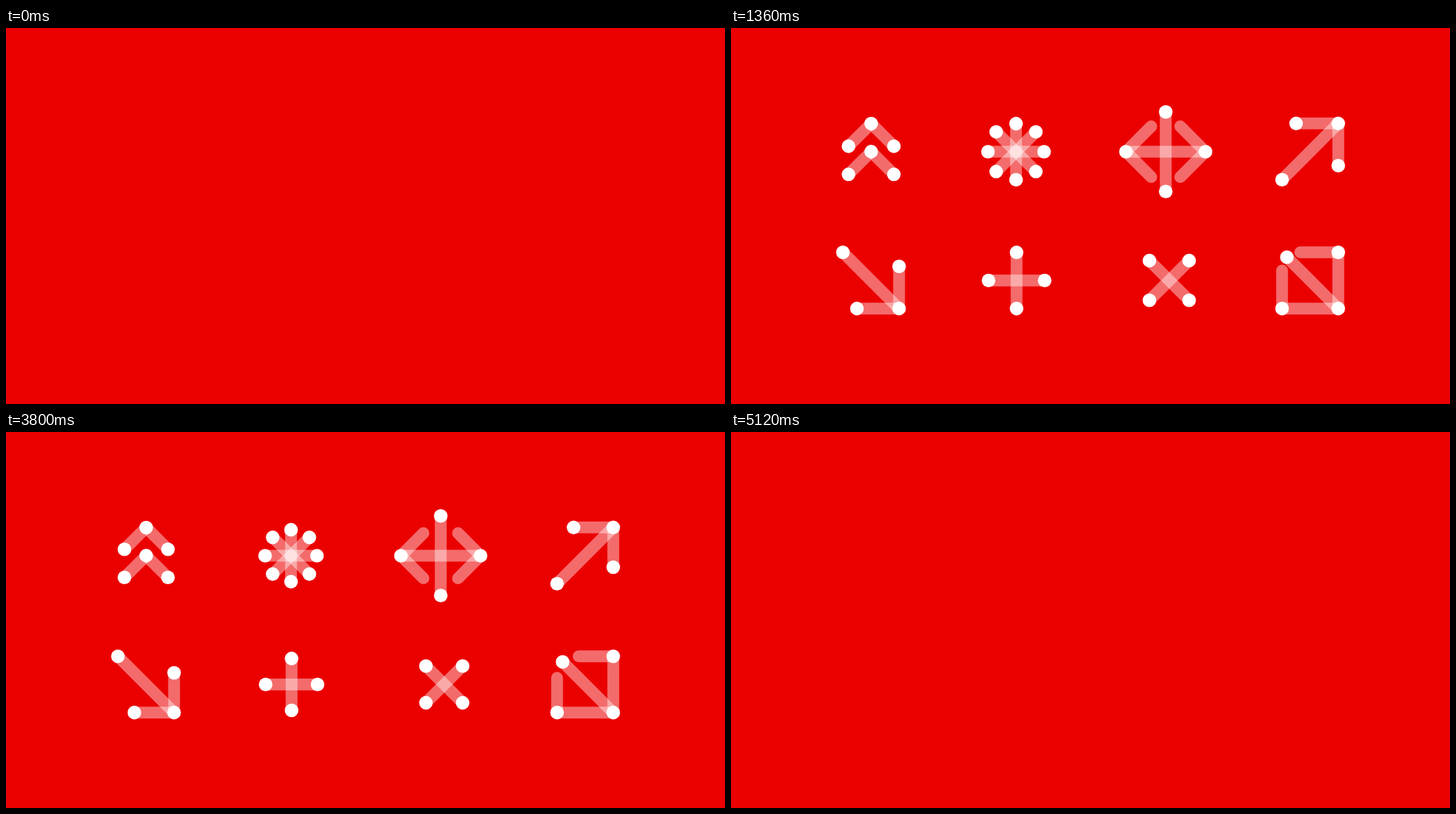
Recreate the animation shown at these times as an HTML page with a canvas. Size 1035 by 541 pixels, loop 5.16 s.

```html
<!DOCTYPE html>
<html lang="en">
<head>
<meta charset="utf-8">
<title>Arrows and stars</title>
<style>
  html, body { margin: 0; height: 100%; overflow: hidden; background: #eb0000; }
  canvas { display: block; }
</style>
</head>
<body>
<canvas id="stage" width="1035" height="541"></canvas>
<script>
const ctx = document.getElementById('stage').getContext('2d');
const LOOP = 5160, STEP = 40;
const DOT = 9.8, BAR = 17;
const HALF = 40.45, REACH = 57.3;
const BACKGROUND = '#eb0000', BAR_COLOR = 'rgba(255,255,255,0.42)';

let now = 0;
let dots = [];

// Cubic Bezier easing through (x1, 0) and (x2, 1), between two times.
function ease(start, end, x2 = 0.17, x1 = 0.2) {
  const x = (now - start) / (end - start);
  if (x <= 0) return 0;
  if (x >= 1) return 1;
  let low = 0, high = 1;
  for (let i = 0; i < 24; i++) {
    const p = (low + high) / 2, q = 1 - p;
    if (3 * q * q * p * x1 + 3 * q * p * p * x2 + p ** 3 < x) low = p;
    else high = p;
  }
  return low * low * (3 - 2 * low);
}

const mix = (a, b, k) => [a[0] + (b[0] - a[0]) * k, a[1] + (b[1] - a[1]) * k];

function bar(a, b) {
  if (Math.hypot(b[0] - a[0], b[1] - a[1]) < 0.5) return;
  ctx.beginPath();
  ctx.moveTo(...a);
  ctx.lineTo(...b);
  ctx.stroke();
}

// Grows a bar from a towards b and returns the moving tip.
function grow(a, b, k) {
  const tip = mix(a, b, k);
  bar(a, tip);
  return tip;
}

function spokes(cx, cy, radius, count, turn = 0) {
  for (let i = 0; i < count; i++) {
    const angle = turn + i * Math.PI / count;
    const dx = radius * Math.cos(angle), dy = radius * Math.sin(angle);
    const a = [cx - dx, cy - dy], b = [cx + dx, cy + dy];
    bar(a, b);
    dots.push(a, b);
  }
}

function chevrons(cx, cy) {
  const base = [cx, cy];
  const top = mix(base, [cx, cy - HALF], ease(328, 889));
  const k = ease(770, 2000);
  dots.push(base, top);
  for (const [x, y] of [top, base])
    for (const side of [-1, 1])
      dots.push(grow([x, y], [x + side * HALF, y + HALF], k));
}

function diamond(cx, cy) {
  spokes(cx, cy, REACH * ease(535, 1240), 2);
  const k = ease(1032, 2000);
  if (k === 0) return;
  for (const sx of [-1, 1])
    for (const sy of [-1, 1])
      grow([cx + sx * REACH, cy], [cx, cy + sy * REACH], k);
}

// Diagonal arrow; direction is -1 for up and 1 for down.
function arrow(cx, cy, direction) {
  const tail = [cx - HALF, cy - direction * HALF];
  const head = grow(tail, [cx + HALF, cy + direction * HALF], ease(375, 993));
  const k = ease(888, 2000), length = 2 * HALF;
  dots.push(tail, head);
  dots.push(grow(head, [head[0] - length, head[1]], k));
  dots.push(grow(head, [head[0], head[1] - direction * length], k));
}

function box(cx, cy) {
  const l = cx - HALF, r = cx + HALF, t = cy - HALF, b = cy + HALF;
  const corner = [r, b], k = ease(324, 1153), closing = ease(990, 2000);
  const left = grow(corner, [l, b], k);
  const top = grow(corner, [r, t], k);
  const diagonal = grow(corner, [l, t], ease(280, 2000));
  grow(left, [left[0], t], closing);
  grow(top, [l, top[1]], closing);
  dots.push(corner, left, top, diagonal);
}

function draw(time) {
  const t = Math.floor((time % LOOP) / STEP) * STEP;
  now = Math.min(t, LOOP - STEP - t);
  dots = [];
  ctx.fillStyle = BACKGROUND;
  ctx.fillRect(0, 0, 1035, 541);

  const pop = ease(0, 360);
  if (pop > 0) {
    ctx.strokeStyle = BAR_COLOR;
    ctx.lineWidth = BAR;
    ctx.lineCap = 'round';
    const spread = REACH * ease(887, 1900, 0.35);

    chevrons(201.8, 177.9);
    spokes(410.3, 178, spread, 4);
    diamond(625.8, 178);
    arrow(833.7, 177.8, -1);
    arrow(201.5, 363.2, 1);
    spokes(411.1, 363.2, spread, 2);
    spokes(630.9, 363.2, spread, 2, Math.PI / 4);
    box(833.7, 363.2);

    ctx.fillStyle = '#fff';
    for (const [x, y] of dots) {
      ctx.beginPath();
      ctx.arc(x, y, DOT * pop, 0, 2 * Math.PI);
      ctx.fill();
    }
  }
}

const begin = performance.now();
function tick() {
  draw(performance.now() - begin);
  requestAnimationFrame(tick);
}
tick();
</script>
</body>
</html>
```
